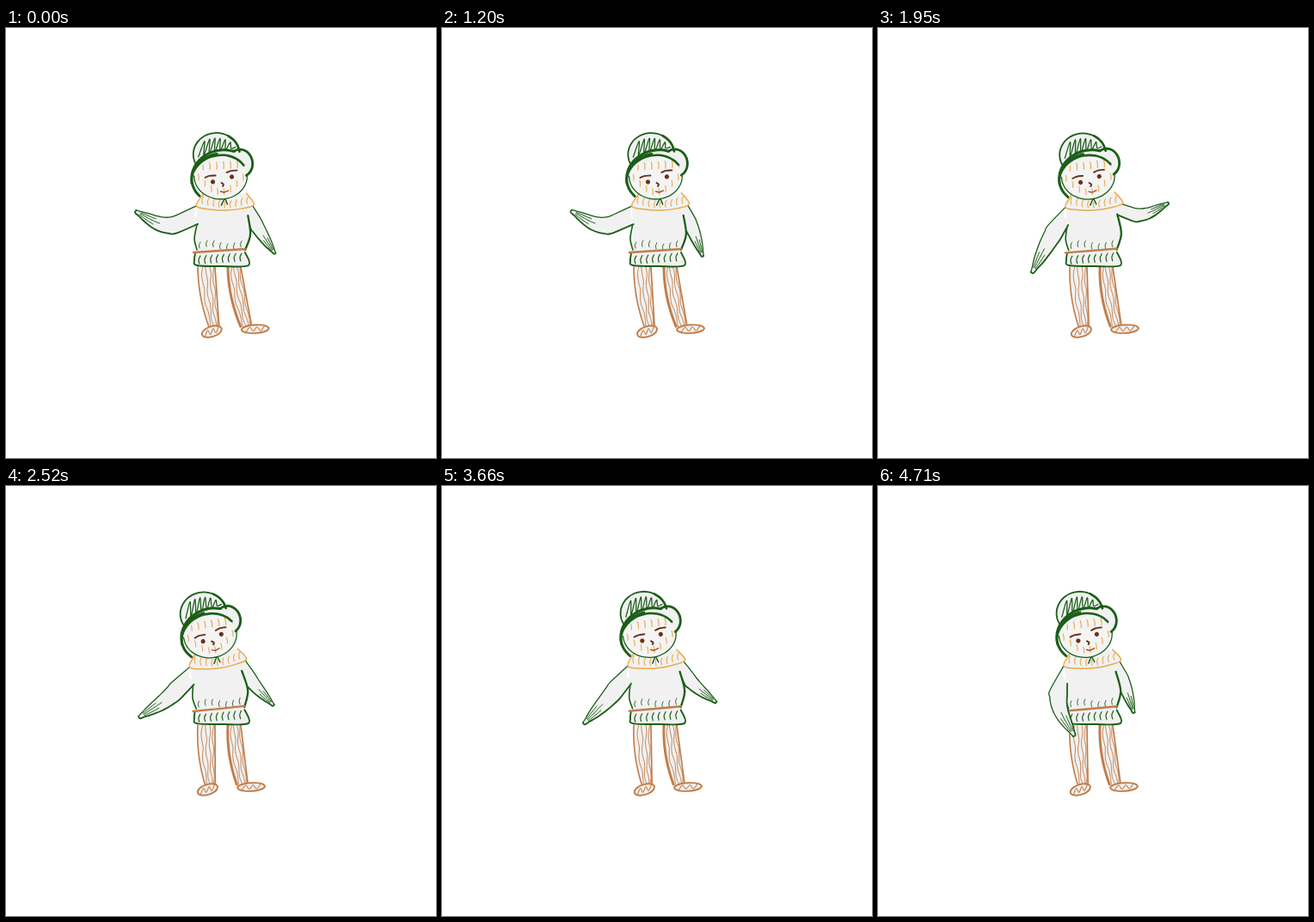
An HTML page for the animation above (4740 ms loop, 500x500 px).

```html
<!DOCTYPE html>
<html lang="en">
<head>
<meta charset="utf-8">
<title>Waving figure</title>
<style>
html, body { margin: 0; width: 100%; height: 100%; overflow: hidden; background: #fff; }
svg { display: block; width: 100vw; height: 100vh; }
path { stroke-linecap: round; stroke-linejoin: round; }
</style>
</head>
<body>
<svg id="stage" viewBox="0 0 500 500" xmlns="http://www.w3.org/2000/svg"></svg>
<script>
const LOOP = 4740, STEP = 30;
const HIP = { x: 250, y: 278 };
const GREEN = '#1b5e18', BROWN = '#c27c48', ORANGE = '#eca94a', DARK = '#6a3018', FILL = '#f1f1f1';
const { sin, cos, sqrt, min, max, PI } = Math;
const rad = deg => deg * PI / 180;
const mix = (a, b, s) => a + (b - a) * s;
const ease = s => (1 - cos(PI * max(0, min(1, s)))) / 2;
const range = (n, f) => Array.from({ length: n + 1 }, (_, i) => f(i / n, i));
const stage = document.getElementById('stage');
const parts = [];

// Smooth open curve through points
function curve(p) {
  const at = i => p[max(0, min(p.length - 1, i))];
  const f = v => v.toFixed(2);
  let d = 'M' + p[0].map(f).join(' ');
  for (let i = 0; i < p.length - 1; i++) {
    const [a, b, c, e] = [at(i - 1), at(i), at(i + 1), at(i + 2)];
    const c1 = b.map((v, k) => v + (c[k] - a[k]) / 6);
    const c2 = c.map((v, k) => v - (e[k] - b[k]) / 6);
    d += 'C' + [...c1, ...c2, ...c].map(f).join(' ');
  }
  return d;
}

function makePath(color, width, fill) {
  const el = document.createElementNS('http://www.w3.org/2000/svg', 'path');
  el.setAttribute('fill', fill || 'none');
  el.setAttribute('stroke', color || 'none');
  el.setAttribute('stroke-width', width);
  stage.appendChild(el);
  return el;
}

// A stroke whose points follow the body each frame
function pen(points, color, width, fill) {
  parts.push({ el: makePath(color, width, fill), points });
}

// Angles in degrees, 0 to the right, clockwise
function arc(x, y, rx, ry, from, to, tilt = 0) {
  const c = cos(rad(tilt)), s = sin(rad(tilt));
  return range(12, q => {
    const a = rad(mix(from, to, q)), u = rx * cos(a), v = ry * sin(a);
    return [x + u * c - v * s, y + u * s + v * c];
  });
}

function ribs(n, start, h, lean, color, width) {
  range(n, (q, i) => {
    const [x, y] = start(q, i);
    pen([[x, y], [x + lean, y + h / 2], [x + lean * .6, y + h]], color, width);
  });
}

function zigzag(n, low, high, color, width) {
  pen(range(n, (q, i) => i % 2 ? high(q) : low(q)), color, width);
}

function leg(x, w, leanL, leanR, thick) {
  const edge = (f, wave = 0) => range(8, s => [
    x + f * w + mix(leanL * s * s, leanR * s, f) + wave * sin(s * 15 + f * 9), mix(HIP.y, 347, s)]);
  pen([...edge(0), ...edge(1).reverse()], null, 0, FILL);
  for (const f of [.25, .48, .7, .88]) pen(edge(f, 1), BROWN, .9);
  pen(edge(0), BROWN, thick);
  pen(edge(1), BROWN, 1.7);
}

function foot(x, y, rx, ry, tilt) {
  pen(arc(x, y, rx, ry, 0, 360, tilt), BROWN, 1.9, FILL);
  const slope = Math.tan(rad(tilt));
  const dot = side => q => [x + mix(-.65, .65, q) * rx, y + side * ry * .5 + mix(-.65, .65, q) * rx * slope];
  zigzag(5, dot(1), dot(-1), BROWN, 1.1);
}

function drawTorso() {
  const left = [[221, 207], [222, 228], [219, 245], [222, 258]];
  const right = [[286, 206], [281, 218], [284, 240], [278, 258]];
  const hem = [[220, 262], [219, 270], [222, 276], [252, 277], [282, 276], [278, 261]];
  pen([...left, ...hem, ...right.slice().reverse()], null, 0, FILL);
  pen(left.slice(1), GREEN, 1.6);
  pen(right.slice(1), GREEN, 2.3);
  pen(hem, GREEN, 1.9);
  ribs(6, q => [mix(226, 274, q), 249 - 2 * sin(q * 7)], 7, -1.5, GREEN, .9);
  ribs(7, q => [mix(226, 274, q), mix(265, 262, q)], 9, -2, GREEN, 1.2);
  pen([[218, 261], [248, 259], [278, 257]], BROWN, 2.4);
}

function drawCollar() {
  const rim = [[229, 193], [221, 207], [237, 211], [255, 212], [273, 210], [288, 205], [279, 192]];
  pen(rim, ORANGE, 1.5, FILL);
  ribs(8, q => [mix(229, 281, q), 196 + 5 * sin(q * PI)], 8, -1.5, ORANGE, 1.1);
}

function drawFace() {
  pen(arc(249, 172, 31, 27, 0, 360), null, 0, '#f4f4f4');
  pen(arc(249, 172, 31, 27, 0, 180), GREEN, 1.3);
  ribs(6, q => [mix(228, 276, q), mix(157, 154, q)], 8, .7, ORANGE, 1.2);
  ribs(7, q => [mix(223, 275, q), 170 + 17 * sin(q * PI)], 7, .6, ORANGE, 1.1);
  pen([[250, 206], [254, 199], [257, 205]], GREEN, 1.5);
  for (const [x, y] of [[240, 179], [262, 173]]) {
    pen(arc(x, y, 2.6, 2.6, 0, 360), null, 0, DARK);
    pen([[x - 9, y - 5], [x - 4, y - 7], [x + 3, y - 7.5]].map(([u, v]) => [u + (x > 250) * 3, v]), DARK, 1.9);
  }
  pen([[250, 180], [252.5, 182], [251.5, 184]], DARK, 1.9);
  pen([[249, 190], [253, 191], [258, 189]], '#a34d2b', 1.4);
}

function drawHat() {
  const crown = arc(244, 147, 27, 25, 145, 352);
  const brim = arc(251, 173, 36, 31, 148, 302, -12);
  const under = arc(248, 176, 33, 28, 185, 338, -12);
  const lobe = arc(272, 157, 14, 16, -112, 72, -10);
  pen(crown, null, 0, FILL);
  pen([...brim.slice(4), ...lobe, ...under.slice().reverse()], null, 0, FILL);
  const dome = x => 147 - 25 * sqrt(1 - ((x - 244) / 27) ** 2);
  zigzag(13, q => [mix(223, 264, q), mix(150, 139, q)],
    q => [mix(227, 266, q), dome(mix(227, 266, q)) + 6], GREEN, 1.3);
  pen(crown, GREEN, 1.8);
  pen(crown.slice(-4), GREEN, 2.6);
  pen(brim, GREEN, 3);
  pen(under, GREEN, 2.6);
  pen(under.slice(2, 8).map(([x, y]) => [x, y - 2]), GREEN, 2.6);
  pen(lobe, GREEN, 2.8);
}

const ARMS = {
  left: { side: -1, top: [221, 207], pit: [223, 228], root: [219, 218], width: 11,
    pose: u => ({ upper: 16 + 43 * u, fore: -30 + 152 * u, size: 75 }) },
  right: { side: 1, top: [286, 206], pit: [280, 218], root: [281, 212], width: 8.5,
    pose: v => ({ upper: 27 + 54 * v ** 1.5, fore: 18 + 122 * v, size: 58 + 7 * v }) }
};

function makeArm(arm) {
  arm.skin = makePath(null, 0, FILL);
  arm.outer = makePath(GREEN, 1.3);
  arm.inner = makePath(GREEN, 1.8);
  arm.hand = makePath(GREEN, 1);
}

// The arm bends smoothly from the upper angle to the forearm angle
function poseArm(arm, amount, bend) {
  const { upper, fore, size } = arm.pose(amount), n = 12;
  let [x, y] = bend(arm.root);
  const spine = range(n, s => {
    const a = rad(mix(upper, fore, ease(s / .75)));
    const here = { x, y, nx: arm.side * cos(a), ny: -sin(a), w: arm.width * max(.06, 1 - s * s) ** .7 };
    x += arm.side * sin(a) * size / n;
    y += cos(a) * size / n;
    return here;
  });
  const rail = (from, to, k) => spine.slice(from, to).map(p => [p.x + p.nx * p.w * k, p.y + p.ny * p.w * k]);
  const outer = [bend(arm.top), ...rail(3, n + 1, 1)];
  const inner = [...rail(4, n + 1, -1).reverse(), bend(arm.pit)];
  arm.skin.setAttribute('d', curve([...outer, ...inner, bend(arm.root)]));
  arm.outer.setAttribute('d', curve(outer));
  arm.inner.setAttribute('d', curve([outer[outer.length - 1], ...inner]));
  arm.hand.setAttribute('d', [-.45, .05, .5].map((k, i) => curve(rail(8 - i % 2, n, k))).join(''));
}

leg(223, 20, 12, 4, 1.6);
leg(258, 15, 14, 12, 2.9);
foot(238.5, 353, 12, 6, -18);
foot(289, 350, 16, 4.8, -3);
makeArm(ARMS.right);
drawTorso();
makeArm(ARMS.left);
drawCollar();
drawFace();
drawHat();

const wave = (t, peak, period) => (1 + cos(2 * PI * (t - peak) / period)) / 2;

function render(t) {
  const calm = 1 - ease((t - 3800) / 500);
  const left = wave(t, 50, 1110) * calm;
  const right = wave(t, 685, 1110) * calm;
  const sway = mix(wave(t, 40, 1060), .48, ease((t - 3200) / 460));
  const lean = .154 * (sway - .95);
  const shift = 1 - 5.5 * (1 - sway * sway);

  // Upper body turns about the hip, more with height; feet slide the other way
  const bend = ([x, y]) => {
    const dx = x - HIP.x, dy = y - HIP.y;
    if (dy > 0) return [x + shift * dy / 78, y];
    const a = lean * min(1, -dy / 60);
    return [HIP.x + dx * cos(a) - dy * sin(a), HIP.y + dx * sin(a) + dy * cos(a)];
  };
  for (const { el, points } of parts) el.setAttribute('d', curve(points.map(bend)));
  poseArm(ARMS.left, left, bend);
  poseArm(ARMS.right, right, bend);
}

const start = performance.now();
function tick(now) {
  const t = max(0, now - start) % LOOP;
  render(Math.floor(t / STEP) * STEP);
  requestAnimationFrame(tick);
}
render(0);
requestAnimationFrame(tick);
</script>
</body>
</html>
```
